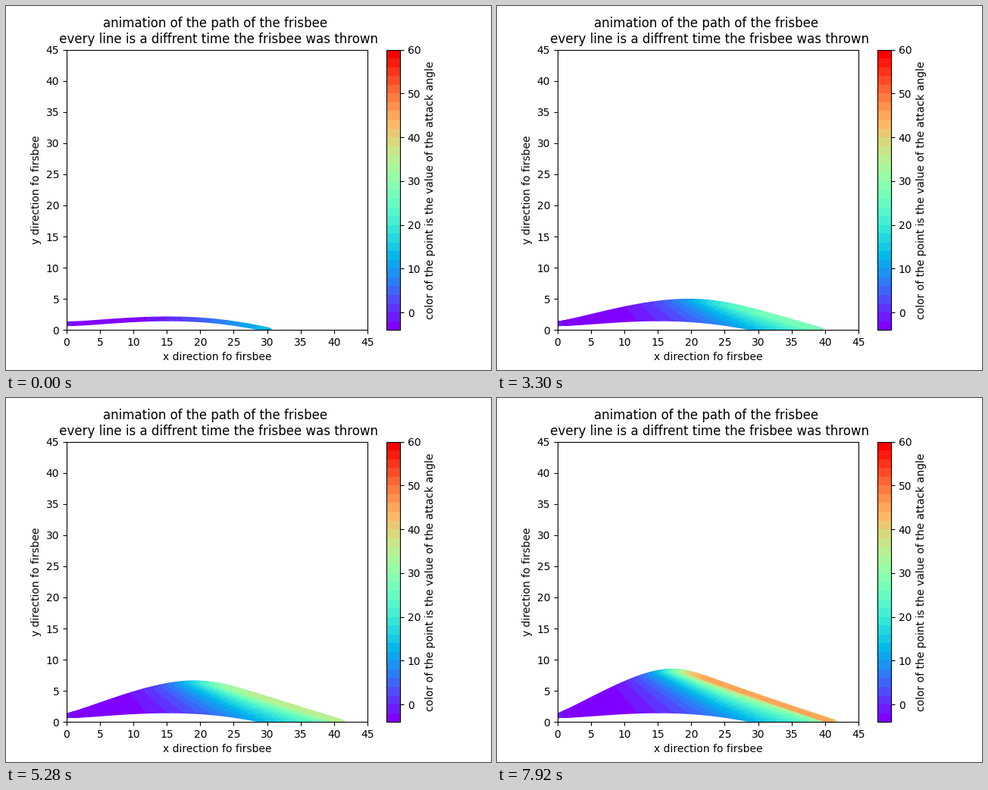
Write a matplotlib script that moves like this. It is 640 px wide and 480 px high and loops after 8000 ms.

```python
import math

import matplotlib.pyplot as plt
import numpy as np
from matplotlib.animation import FuncAnimation
from matplotlib.cm import ScalarMappable
from matplotlib.collections import LineCollection
from matplotlib.colors import Normalize

LOOP, STEP, HOLD = 8000, 40, 330      # ms
THROWS = 25                           # disc tilt grows by one degree per throw
LOW, HIGH, BINS = -4, 60, 32

MASS, AREA, RHO, G = 0.175, 0.057, 1.23, 9.81
CL0, CLA = 0.33, 1.91
CD0, CDA, ALPHA0 = 0.18, 0.69, math.radians(-4)
SPEED, HEIGHT, DT = 20, 1, 0.004


def fly(tilt):
    """Path of one throw and its attack angle in degrees at each point."""
    k = RHO * AREA / (2 * MASS)
    x, y = 0.0, float(HEIGHT)
    vx, vy = SPEED * math.cos(tilt), SPEED * math.sin(tilt)
    path, angles = [], []
    while y > 0:
        alpha = tilt - math.atan2(vy, vx)
        path.append((x, y))
        angles.append(math.degrees(alpha))
        v = math.hypot(vx, vy)
        lift = k * v * (CL0 + CLA * alpha)
        drag = k * v * (CD0 + CDA * (alpha - ALPHA0) ** 2)
        ax_, ay_ = -drag * vx - lift * vy, lift * vx - drag * vy - G
        x += vx * DT + ax_ * DT * DT / 2
        y += vy * DT + ay_ * DT * DT / 2
        vx += ax_ * DT
        vy += ay_ * DT
    return np.array(path), np.array(angles)


def color_runs(path, angles):
    """Split a path into pieces that share one colour level."""
    level = np.floor((angles - LOW) / (HIGH - LOW) * BINS)
    level = np.clip(level, 0, BINS - 1).astype(int)
    cuts = [0, *(np.flatnonzero(np.diff(level)) + 1), len(level)]
    pieces = [path[max(a - 1, 0):b] for a, b in zip(cuts, cuts[1:])]
    return pieces, level[cuts[:-1]]


plt.rcParams["font.family"] = "DejaVu Sans"
fig, ax = plt.subplots(figsize=(6.4, 4.8), dpi=100)
cmap = plt.get_cmap("rainbow", BINS)

bar = fig.colorbar(ScalarMappable(Normalize(LOW, HIGH), cmap), ax=ax)
bar.set_label("color of the point is the value of the attack angle")

ax.set(xlim=(0, 45), ylim=(0, 45),
       xticks=range(0, 46, 5), yticks=range(0, 46, 5),
       xlabel="x direction fo firsbee", ylabel="y direction fo firsbee")
ax.set_title("animation of the path of the frisbee \n"
             " every line is a diffrent time the frisbee was thrown")

throws = []
for degree in range(THROWS):
    pieces, levels = color_runs(*fly(math.radians(degree)))
    line = LineCollection(pieces, colors=cmap(levels), linewidths=4.5,
                          capstyle="round", joinstyle="round", zorder=1)
    throws.append(ax.add_collection(line, autolim=False))


def draw(i):
    shown = int((i + 0.5) * STEP // HOLD)
    for n, line in enumerate(throws):
        line.set_visible(n <= shown)
    return throws


anim = FuncAnimation(fig, draw, frames=LOOP // STEP, interval=STEP,
                     repeat=True, repeat_delay=0)
plt.show()
```
